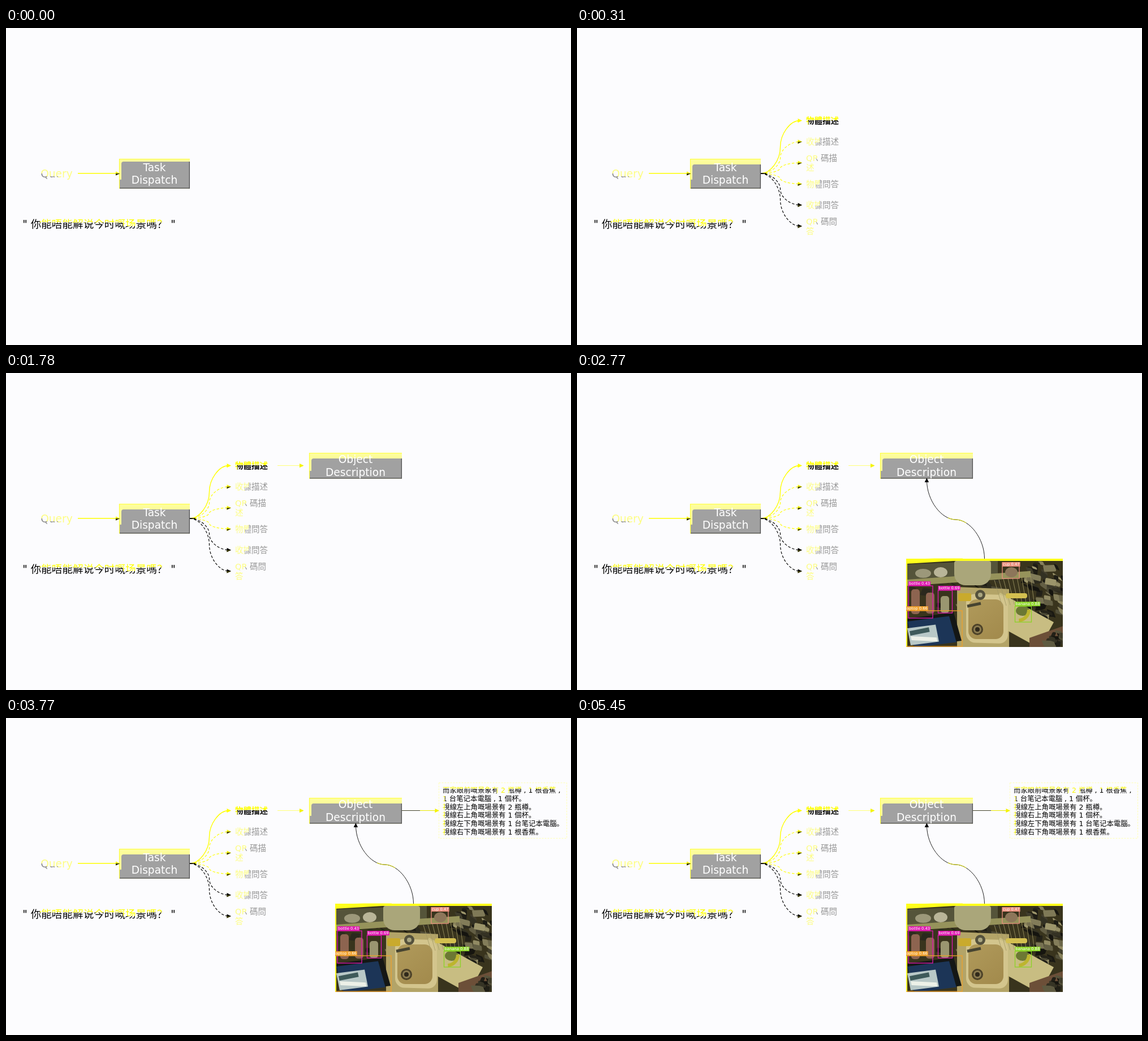
Animation of 999x560 px, one loop 5.69 s. Source, as an HTML page with a canvas:

```html
<!DOCTYPE html>
<html lang="zh-CN">
<head>
<meta charset="utf-8">
<title>Task dispatch</title>
<style>
html, body { margin: 0; width: 100%; height: 100%; overflow: hidden; background: #fcfcfe; }
canvas { display: block; }
</style>
</head>
<body>
<canvas id="stage" width="999" height="560"></canvas>
<script>
const ctx = document.getElementById('stage').getContext('2d');
const LOOP = 5690;
const SANS = '"DejaVu Sans", "Noto Sans CJK SC", "Noto Sans CJK JP", sans-serif';
const PAPER = '#fcfcfe', YELLOW = '#ffff00', PALE = '#fdfd82', BAND = '#fdfd9b', GREY = '#a1a1a1', INK = '#000';

function rect(color, x, y, w, h) {
  ctx.fillStyle = color;
  ctx.fillRect(x, y, w, h);
}

function rounded(color, x, y, w, h, r) {
  ctx.beginPath();
  ctx.roundRect(x, y, w, h, r);
  ctx.fillStyle = color;
  ctx.fill();
}

function oval(color, x, y, rx, ry = rx) {
  ctx.beginPath();
  ctx.ellipse(x, y, rx, ry, 0, 0, 7);
  ctx.fillStyle = color;
  ctx.fill();
}

function line(color, width, x1, y1, x2, y2) {
  ctx.beginPath();
  ctx.moveTo(x1, y1);
  ctx.lineTo(x2, y2);
  ctx.strokeStyle = color;
  ctx.lineWidth = width;
  ctx.stroke();
}

// Runs a drawing in a sheared frame, for flat things seen at an angle.
function tilted(x, y, slopeX, slopeY, draw) {
  ctx.save();
  ctx.transform(1, slopeX, slopeY, 1, x, y);
  draw();
  ctx.restore();
}

function slab(color, x, y, w, h, slopeX = 0, slopeY = 0, r = 0) {
  tilted(x, y, slopeX, slopeY, () => rounded(color, 0, 0, w, h, r));
}

function clipped(areas, draw) {
  ctx.save();
  ctx.beginPath();
  areas.forEach(a => ctx.rect(...a));
  ctx.clip();
  draw();
  ctx.restore();
}

function text(str, x, y, size, color, align = 'left', weight = '') {
  ctx.font = `${weight} ${size}px ${SANS}`;
  ctx.textAlign = align;
  ctx.fillStyle = color;
  ctx.fillText(str, x, y);
}

// Draws in one colour, then again in another inside some rectangles.
function twoTone(draw, base, tint, ...areas) {
  draw(base);
  clipped(areas, () => {
    rect(PAPER, 0, 0, 999, 560);
    draw(tint);
  });
}

function head(x, y, color, shade = color, angle = 0) {
  ctx.save();
  ctx.translate(x, y);
  ctx.rotate(angle);
  for (const [fill, top] of [[color, -3.6], [shade, 0]]) {
    ctx.beginPath();
    ctx.moveTo(-7.5, top);
    ctx.lineTo(0, 0);
    ctx.lineTo(-7.5, 3.6);
    ctx.fillStyle = fill;
    ctx.fill();
  }
  ctx.restore();
}

// S-shaped link that leaves and arrives along the same axis.
function link(x0, y0, x1, y1, color, width, vertical = false) {
  const mx = (x0 + x1) / 2, my = (y0 + y1) / 2;
  const qx = (x1 - x0) / 4, qy = (y1 - y0) / 4;
  ctx.beginPath();
  ctx.moveTo(x0, y0);
  if (vertical) {
    ctx.bezierCurveTo(x0, y0 + qy, mx - qx, my, mx, my);
    ctx.bezierCurveTo(mx + qx, my, x1, y1 - qy, x1, y1);
  } else {
    ctx.bezierCurveTo(x0 + qx, y0, mx, my - qy, mx, my);
    ctx.bezierCurveTo(mx, my + qy, x1 - qx, y1, x1, y1);
  }
  ctx.strokeStyle = color;
  ctx.lineWidth = width;
  ctx.stroke();
}

function box(x, y, w, h, words, settled) {
  const band = settled ? 10 : 5, right = x + w, bottom = y + h;
  rect(BAND, x, y, w, h);
  rounded(GREY, x + 4, y + band, w - 4, h - band, [4, 0, 0, 0]);
  rect(GREY, x + 1, bottom - h * .3, 4, h * .3);
  line('#ffff3c', 1.2, x, y + .5, right, y + .5);
  line('#ffff3c', 1.2, x + .5, y, x + .5, bottom);
  line('#505050', 1.3, x + 1, bottom - .6, right, bottom - .6);
  line('#505050', 1.3, right - .6, y + band, right - .6, bottom);
  words.forEach((word, i) => text(word, x + w / 2, y + h / 2 - 4.5 + i * 22.3, 18.6, '#fff', 'center'));
}

function query() {
  twoTone(c => text('Query', 61.2, 264, 18.6, c), PALE, '#929292', [61, 257, 9, 13], [70, 262, 22, 8]);
  line(YELLOW, 1.5, 127, 256.8, 196, 256.8);
  head(201.5, 257, '#f0f000', '#2a2a00');
  twoTone(c => text('" 你能唔能解说今时嘅场景嗎？ "', 29.2, 353, 18.6, c), INK, YELLOW,
    [60, 336, 215, 7.5], [207, 336, 22, 14]);
}

const branches = ['物體描述', '收據描述', 'QR 碼描\n述', '物體問答', '收據問答', 'QR 碼問\n答'];

function branch(label, i) {
  const y = 163.5 + i * 37.3;
  const chosen = i === 0, dark = i > 3;
  ctx.setLineDash(chosen ? [] : [4.5, 3]);
  link(325, 257, 394, y, dark ? INK : YELLOW, chosen ? 1.4 : 1.15);
  ctx.setLineDash([]);
  head(398, y, dark ? INK : YELLOW, chosen ? YELLOW : '#403f00');

  const rows = label.split('\n');
  rows.forEach((str, n) => {
    const base = y + 5.3 + (n - (rows.length - 1) / 2) * 17.6;
    const draw = c => text(str, 405, base, 14.5, c, 'left', chosen ? 'bold' : '');
    if (chosen) twoTone(draw, INK, YELLOW, [404, base - 15, 61, 9], [404, base - 6, 5, 9]);
    else twoTone(draw, '#999', PALE, [404, base - 14, 25, 10], [404, base - 4, 18, 6]);
  });
}

function branchGroup(progress) {
  clipped([[324, 150, 2 + 140 * progress, 225]], () => {
    branches.forEach(branch);
    line(INK, 1.5, 325, 257, 335, 257);
  });
}

function arrow(x1, x2, y, color, width) {
  line(color, width, x1, y, x2 - 6, y);
  head(x2, y, '#f4f400');
}

function upwardLink() {
  const draw = color => link(720.5, 328, 618.5, 190, color, 1, true);
  draw('#222');
  clipped([[656, 250, 32, 16]], () => draw('#e0e000'));
  head(618.3, 185.5, INK, INK, -Math.PI / 2);
}

function randomizer(seed) {
  return () => {
    seed = (seed * 16807) % 2147483647;
    return seed / 2147483647;
  };
}

// Small scattered things inside an area.
function clutter(seed, count, x, y, w, h, light) {
  const random = randomizer(seed);
  for (let i = 0; i < count; i++) {
    const tone = 20 + light * random() ** 2;
    slab(`rgb(${tone * 1.05}, ${tone}, ${tone * .72})`, x + w * random(), y + h * random(),
      6 + 16 * random(), 3 + 10 * random(), random() - .2, random() - .5, 2);
  }
}

function kitchen() {
  rect('#39341d', 582, 328, 277, 156);
  clutter(11, 40, 584, 334, 150, 80, 90);
  clutter(23, 70, 785, 330, 70, 95, 130);

  // shelf with dishes
  slab('#55543a', 584, 338, 160, 28, -.04);
  slab('#96935b', 584, 365, 218, 11, -.07);
  oval('#9c987a', 612, 354, 14, 8);
  oval('#b9b598', 643, 352, 12, 9);
  rounded('#aaa67a', 667, 332, 65, 43, [4, 4, 20, 20]);
  oval('#8d765a', 768, 352, 11, 9);

  // worktop, basin and tap
  slab('#b3a468', 672, 378, 92, 106, .04);
  slab('#c8bd82', 748, 388, 95, 46, .55, -.55);
  slab('#d3c58d', 688, 390, 74, 86, .03, 0, 16);
  const bowl = ctx.createLinearGradient(690, 400, 745, 475);
  bowl.addColorStop(0, '#b09a5b');
  bowl.addColorStop(1, '#a28a4c');
  rounded(bowl, 692, 400, 62, 70, 14);
  oval('#4d4228', 708, 453, 10);
  oval('#8b7b50', 708, 453, 7);
  oval('#30291b', 708, 453, 4);
  line('#464431', 5, 690, 412, 714, 407);
  oval('#54513c', 713, 392, 9);
  oval('#aaa680', 713, 392, 4);
  rounded('#c9aa2d', 674, 389, 23, 14, 3);

  // dish rack, fruit and floor
  for (let i = 0; i < 9; i++) line('#a39a66', .8, 738 + i * 8, 366 - i, 752 + i * 7, 412 - i);
  rounded('#d3bf50', 758, 389, 38, 9, 4);
  oval('#6c7834', 788, 420, 12, 9);
  ctx.beginPath();
  ctx.arc(780, 418, 19, 0, 1.5);
  ctx.strokeStyle = '#bdb52e';
  ctx.lineWidth = 6;
  ctx.stroke();
  slab('#6c4f38', 800, 468, 70, 30, -.35);
  clutter(5, 12, 815, 445, 40, 35, 170);

  // bottles and portable computer
  for (let i = 0; i < 3; i++) rounded(i < 2 ? '#8d6450' : '#9a9670', 591 + i * 26, 382 + i * 6, 15, 44 - i * 7, 5);
  slab('#141715', 582, 434, 84, 50, -.13, .28);
  slab('#1c3557', 584, 439, 74, 46, -.13, .28);
  slab('#b8c8c7', 584, 451, 50, 30, -.13, .2);
  slab('#3e5a5a', 588, 456, 34, 8, -.2, .2);
  slab('#edf1e8', 590, 465, 46, 7, .05, .2);

  rect('#ffff1c', 582, 328, 277, 4);
  slab('#ffff1c', 582, 330, 100, 7, -.06);
  rect('#ffff1c', 582, 328, 2, 156);
}

function detection(color, label, x, y, w, h) {
  ctx.strokeStyle = color;
  ctx.lineWidth = 1.3;
  ctx.strokeRect(x, y, w, h);
  const top = Math.max(y - 8, 334);
  ctx.font = `6.8px ${SANS}`;
  rect(color, x, top, ctx.measureText(label).width + 2, 8);
  text(label, x + 1, top + 6.3, 6.8, '#fff');
}

function photo() {
  clipped([[582, 327.5, 277, 156.5]], () => {
    kitchen();
    detection('#e98f7e', 'cup 0.47', 752, 335, 30, 28);
    detection('#df18b0', 'bottle 0.43', 586, 376, 43, 57);
    detection('#df18b0', 'bottle 0.69', 638.5, 384, 25, 40);
    detection('#f0a02b', 'laptop 0.66', 580, 420, 101, 63);
    detection('#8bd327', 'banana 0.88', 774.5, 412, 29, 28);
  });
}

const answer = [
  '而家眼前嘅景象有 2 瓶樽 , 1 根香蕉 ,',
  '1 台笔记本電腦 , 1 個杯。',
  '視線左上角嘅場景有 2 瓶樽。',
  '視線右上角嘅場景有 1 個杯。',
  '視線左下角嘅場景有 1 台笔记本電腦。',
  '視線右下角嘅場景有 1 根香蕉。',
];

function answerText() {
  ctx.setLineDash([3, 2]);
  ctx.strokeStyle = '#ffffb4';
  ctx.lineWidth = 1;
  ctx.strokeRect(765.5, 114.5, 226, 98);
  ctx.setLineDash([]);
  const draw = c => answer.forEach((str, i) => text(str, 772, 131.8 + i * 14.85, 12.4, c));
  twoTone(draw, INK, '#f8f800', [768, 118, 220, 7], [768, 135, 8, 75], [868, 118, 22, 16]);
}

function render(t) {
  rect(PAPER, 0, 0, 999, 560);
  box(200, 231, 125, 52.5, ['Task', 'Dispatch'], t >= 30);
  query();
  if (t >= 30) branchGroup(Math.min(7, Math.floor((t - 30) / 46.6) + 1) / 7);
  if (t >= 590) arrow(480, 526.5, 163.5, '#ffff78', 1);
  if (t >= 1080) box(536, 141, 164, 45.5, ['Object', 'Description'], t >= 1190);
  if (t >= 1910) photo();
  if (t >= 2190) upwardLink();
  if (t >= 2810) {
    arrow(700, 766, 163.5, '#e8e800', 1);
    line('#44442c', 1, 700, 163.5, 732, 163.5);
  }
  if (t >= 2910) answerText();
}

const start = performance.now();
function tick() {
  render((performance.now() - start) % LOOP);
  requestAnimationFrame(tick);
}
tick();
</script>
</body>
</html>
```
